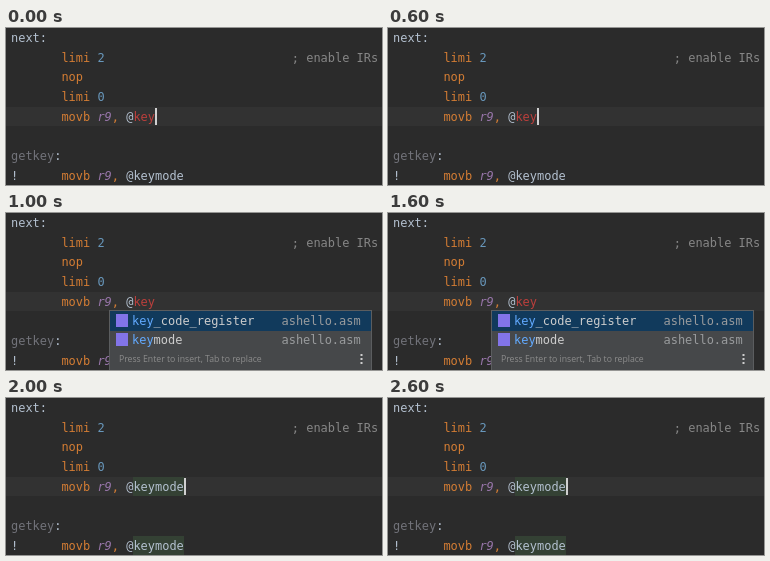
These frames come from a looping animation (376 px wide and 157 px high, 3000 ms). An HTML page with a canvas:

```html
<!DOCTYPE html>
<html lang="en">
<head>
<meta charset="utf-8">
<title>Code completion</title>
<style>
  html, body { margin: 0; width: 100%; height: 100%; overflow: hidden; background: #2b2b2b; }
  canvas { display: block; width: 376px; height: 157px; }
</style>
</head>
<body>
<canvas id="stage"></canvas>
<script>
const W = 376, H = 157, LOOP = 3000;
const LEFT = 5, COL = 7.2, ROW = 19.75, BASE = 13.8;
const MONO = '11.96px "DejaVu Sans Mono", "Noto Sans Mono", monospace';
const HINT = '8.7px "Open Sans", "Noto Sans", sans-serif';
const INK = {
  back: '#2b2b2b', line: '#323232', usage: '#344134', text: '#b4c1d0',
  keyword: '#d47d34', number: '#6897bb', register: '#9876aa', error: '#bc3f3c',
  comment: '#868686', unused: '#72737a', caret: '#d0d0d0',
  popup: '#46484a', border: '#5b5d5f', selected: '#113a5c',
  match: '#62aaff', item: '#cdcdcd', file: '#999b9d', hint: '#8c8c8c', icon: '#8274e8'
};

const canvas = document.getElementById('stage');
const scale = window.devicePixelRatio || 1;
canvas.width = W * scale;
canvas.height = H * scale;
const ctx = canvas.getContext('2d');
ctx.scale(scale, scale);

function box(x, y, w, h, color) {
  ctx.fillStyle = color;
  ctx.fillRect(x, y, w, h);
}

function text(str, x, y, color, font = MONO) {
  ctx.font = font;
  ctx.fillStyle = color;
  ctx.fillText(str, x, y);
}

const colX = col => LEFT + col * COL;

function code(row, col, str, color, style = '') {
  text(str, colX(col), Math.round(BASE + row * ROW), color, style + MONO);
}

function move(row, operand, color) {
  code(row, 7, 'movb', INK.keyword);
  code(row, 12, 'r9', INK.register, 'italic ');
  code(row, 14, ',', INK.keyword);
  code(row, 16, '@', INK.text);
  code(row, 17, operand, color);
}

function editor(operand, accepted) {
  box(0, 0, W, H, INK.back);
  box(0, 79, W, 19, INK.line);
  if (accepted) {
    box(127, 79, 51, 19, INK.usage);
    box(127, 138, 51, 19, INK.usage);
  }
  code(0, 0, 'next:', INK.text);
  code(1, 7, 'limi', INK.keyword);
  code(1, 12, '2', INK.number);
  code(1, 39, '; enable IRs', INK.comment);
  code(2, 7, 'nop', INK.keyword);
  code(3, 7, 'limi', INK.keyword);
  code(3, 12, '0', INK.number);
  move(4, operand, accepted ? INK.text : INK.error);
  code(6, 0, 'getkey', INK.unused);
  code(6, 6, ':', INK.text);
  code(7, 0, '!', INK.text);
  move(7, 'keymode', INK.text);
}

function caret(col) {
  box(Math.round(colX(col)), 80, 2, 17, INK.caret);
}

function suggestion(y, rest) {
  box(110, y - 11, 12, 13, INK.icon);
  text('key', 126, y, INK.match);
  text(rest, 126 + 3 * COL, y, INK.item);
  text('ashello.asm', 275.5, y, INK.file);
}

function popup() {
  box(103, 97, 263, 60, INK.border);
  box(104, 98, 261, 59, INK.popup);
  box(104, 98, 261, 20, INK.selected);
  suggestion(112, '_code_register');
  suggestion(131, 'mode');
  text('Press Enter to insert, Tab to replace', 113, 149, INK.hint, HINT);
  for (let i = 0; i < 3; i++) box(354.5, 141 + i * 4, 2, 2, INK.item);
}

function draw(ms) {
  const step = Math.floor((ms % LOOP) / 1000);
  const accepted = step === 2;
  editor(accepted ? 'keymode' : 'key', accepted);
  if (step === 1) popup();
  else caret(accepted ? 24 : 20);
}

const start = performance.now();
function tick() {
  draw(performance.now() - start);
  requestAnimationFrame(tick);
}
tick();
</script>
</body>
</html>
```
